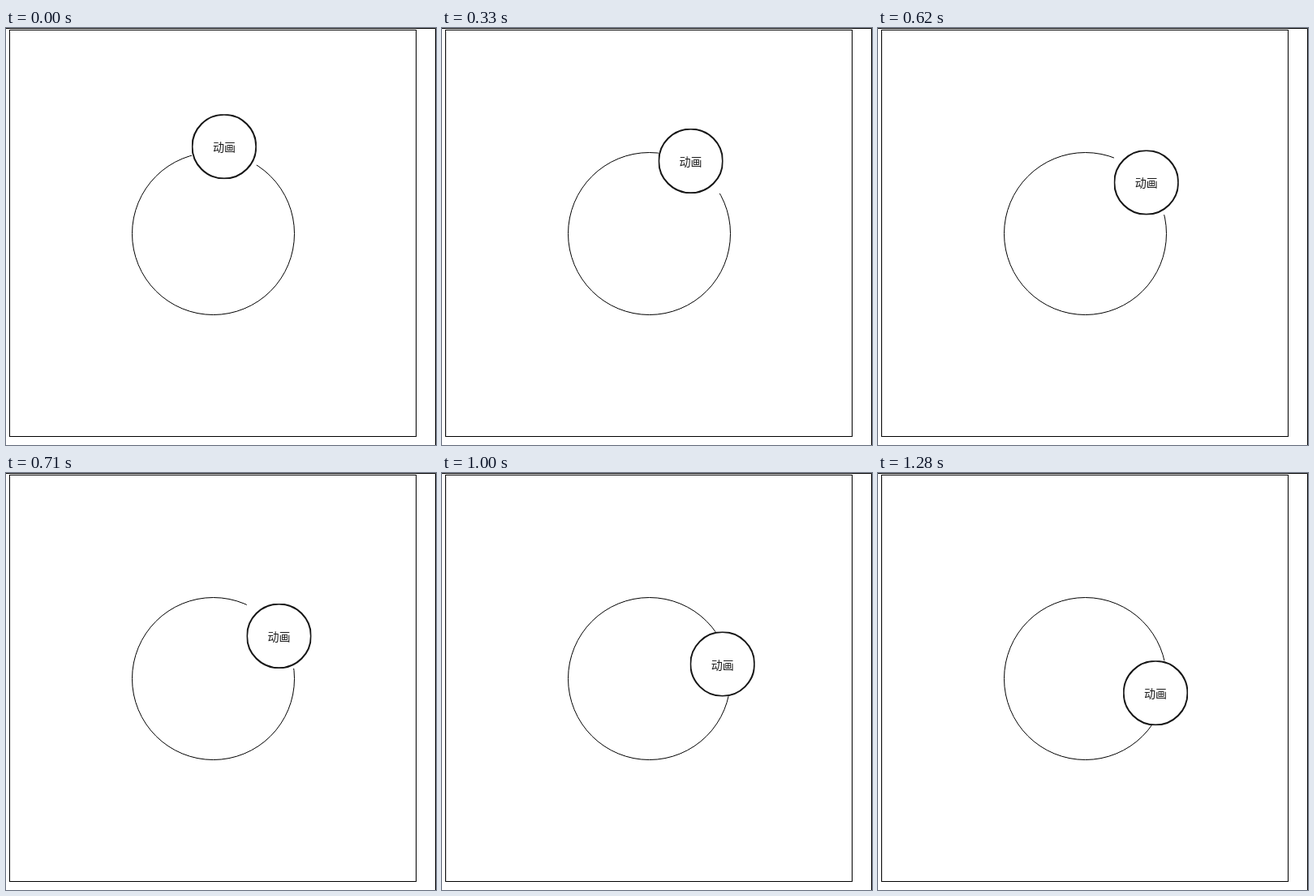
Animation of 530x514 px, one loop 1330 ms. Source, as an HTML page:

```html
<!DOCTYPE html>
<html lang="zh">
<head>
<meta charset="utf-8">
<title>Orbit</title>
<style>
  html, body { margin: 0; width: 100%; height: 100%; overflow: hidden; background: #fff; }
  svg { display: block; }
  text { font: 14px "Noto Sans CJK SC", "Noto Sans CJK", sans-serif; fill: #1c1c1c; text-anchor: middle; }
</style>
</head>
<body>
<svg width="530" height="514" viewBox="0 0 530 514">
  <rect width="530" height="514" fill="#fff"/>
  <g fill="none" stroke="#000">
    <path d="M0 .5H529.5V514"/>
    <rect x="4.5" y="2.5" width="501" height="501"/>
    <circle cx="255.5" cy="253.5" r="100"/>
  </g>
  <!-- The nested viewport clips the badge to its 80px tile -->
  <svg id="badge" width="80" height="80" overflow="hidden">
    <rect width="80" height="80" fill="#fff"/>
    <circle cx="40" cy="40" r="39.4" fill="none" stroke="#151515" stroke-width="2"/>
    <text x="40" y="46">动画</text>
  </svg>
</svg>
<script>
  const LOOP = 1330;
  const GROUP = 190;
  const OFFSETS = [0, 50, 90, 140]; // four ticks per group, in ms
  const START = -1.34, STEP = 0.06, RADIUS = 100;
  const ORIGIN = { x: 206, y: 203.5 };
  const badge = document.getElementById('badge');

  function tickAt(ms) {
    const t = ms % LOOP;
    const within = t % GROUP;
    return Math.floor(t / GROUP) * 4 + OFFSETS.filter(o => o <= within).length - 1;
  }

  function render(ms) {
    const angle = START + STEP * tickAt(ms);
    badge.setAttribute('x', ORIGIN.x + RADIUS * Math.cos(angle));
    badge.setAttribute('y', ORIGIN.y + RADIUS * Math.sin(angle));
  }

  let began;
  function loop(now) {
    began ??= now;
    render(now - began);
    requestAnimationFrame(loop);
  }

  render(0);
  requestAnimationFrame(loop);
</script>
</body>
</html>
```
